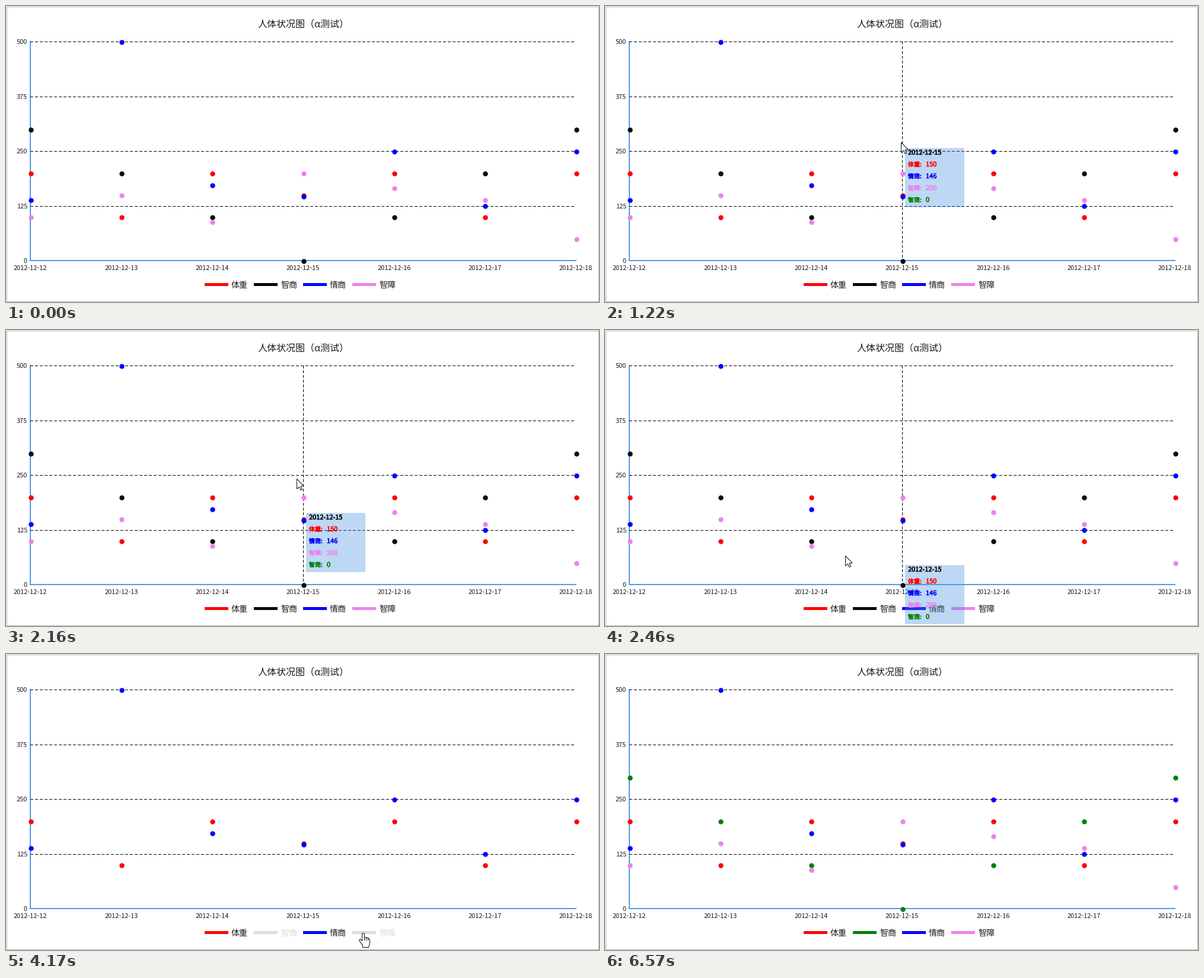
Write a matplotlib script that moves like this. It is 1000 px wide and 500 px high and loops after 6850 ms.

```python
import numpy as np
import matplotlib.pyplot as plt
from matplotlib.animation import FuncAnimation
from matplotlib.patches import Polygon, Rectangle
from matplotlib.patheffects import withStroke

W, H, DPI = 1000, 500, 100
LOOP, STEP = 6850, 25
PX = 72 / DPI
LEFT, RIGHT, TOP, BOTTOM = 41, 961, 60, 430
LEAD = 80          # the tooltip runs ahead of the drawn pointer (ms)
AXIS, TIP, OFF, INK = "#559ae8", "#4a90e2", "#dddddd", "#1a1a1a"

plt.rcParams["font.family"] = "Noto Sans CJK JP"

DATES = [f"2012-12-{d}" for d in range(12, 19)]
DAY_X = np.linspace(LEFT, RIGHT, len(DATES))
SERIES = {
    "体重": ("red", [200, 100, 200, 150, 200, 100, 200]),
    "智商": ("#0a0a0a", [300, 200, 100, 0, 100, 200, 300]),
    "情商": ("blue", [138, 500, 172, 146, 250, 125, 250]),
    "智障": ("violet", [100, 150, 89, 200, 165, 138, 50]),
}
TIP_ORDER = ["体重", "情商", "智障", "智商"]

# pointer moves: depart, arrive, x, y; it rests in between
START = (149, 484)
MOVES = [
    (50, 240, 294, 330), (590, 700, 375, 256), (890, 1200, 499, 230),
    (1280, 1730, 606, 167), (1730, 1900, 622, 140), (1960, 2160, 494, 245),
    (2160, 2400, 395, 380), (2430, 2610, 440, 386), (2640, 2760, 425, 442),
    (2760, 3090, 437, 474), (3300, 3810, 602, 471), (4360, 4520, 613, 470),
    (5040, 5530, 440, 473), (6040, 6550, 470, 510),
]
ENTER, LEAVE = MOVES[0][0], MOVES[-1][1]

ARROW = np.array([(0, 0), (0, 17), (4, 13.5), (6.5, 19), (9, 18),
                  (6.5, 12.5), (11.5, 12)])
KNUCKLES = [p for k in range(3)
            for p in [(2 + 3 * k, 7 + k / 2), (2 + 3 * k, 12), (2 + 3 * k, 7 + k / 2)]]
HAND = np.array([(-2, 13), (-2, 1), (0, 0), (2, 1), *KNUCKLES, (11, 11),
                 (11, 17), (9, 24), (-1, 24), (-1, 21), (-7, 12), (-5, 10)])

fig = plt.figure(figsize=(W / DPI, H / DPI), dpi=DPI, facecolor="white")
ax = fig.add_axes([0, 0, 1, 1])
ax.set_xlim(0, W)
ax.set_ylim(H, 0)
ax.axis("off")


def y_of(value):
    return BOTTOM - np.asarray(value) * (BOTTOM - TOP) / 500


def label(x, y, s, size, color=INK, ha="left", **kw):
    """Text whose glyphs are vertically centred on y."""
    return ax.text(x, y + 0.37 * size, s, fontsize=size * PX, color=color,
                   ha=ha, va="baseline", **kw)


def box(x, y, w, h, color, **kw):
    return ax.add_patch(Rectangle((x, y), w, h, fc=color, lw=0, **kw))


def dashed(xs, ys):
    return ax.plot(xs, ys, color="black", lw=PX, ls=(0, (5, 3)), zorder=2,
                   snap=False)[0]


# frame, title, axes and grid
ax.add_patch(Rectangle((0.5, 0.5), 998, 498, fill=False, ec="#b4b4b4", lw=PX))
label(424, 30.5, "人体状况图（α测试）", 16)
box(LEFT - 1, TOP - 1, 2, BOTTOM - TOP + 1, AXIS)
box(LEFT - 1, BOTTOM - 1, RIGHT - LEFT + 2, 2, AXIS)
for v in range(0, 501, 125):
    label(36, y_of(v), str(v), 11, ha="right")
    if v:
        dashed([LEFT, RIGHT], [np.ceil(y_of(v)) + 0.5] * 2)
for x, day in zip(DAY_X, DATES):
    label(x, 442, day, 11, ha="center")

# series dots and legend
dots, bars, names = {}, {}, {}
for i, (name, (color, values)) in enumerate(SERIES.items()):
    x = 335 + 83 * i
    dots[name] = ax.scatter(DAY_X + 0.5, y_of(values) + 0.5, s=(8.4 * PX) ** 2,
                            c=color, linewidths=0, zorder=3 + 0.1 * i)
    bars[name] = box(x, 468, 40, 5, color)
    names[name] = label(x + 45, 471, name, 14)

# hover guide and tooltip
guide = dashed([0, 0], [TOP, BOTTOM])
tip_box = box(0, 0, 100, 100, TIP, alpha=0.36, zorder=5)


def bold(s, size, color):
    return label(0, 0, s, size, color, zorder=6,
                 path_effects=[withStroke(linewidth=0.45, foreground=color)])


# each part: text artist and its offset in the tooltip
tip_date = bold("", 11, "black")
tip_parts = [(tip_date, 5, 11)]
tip_values = {}
for i, name in enumerate(TIP_ORDER):
    color = "green" if name == "智商" else SERIES[name][0]
    tip_values[name] = bold("", 11, color)
    row_y = 31 + 20 * i
    tip_parts += [(bold(name + ":", 10, color), 5, row_y),
                  (tip_values[name], 35, row_y)]
hover = [guide, tip_box] + [part[0] for part in tip_parts]

pointer = ax.add_patch(Polygon(ARROW, closed=True, fc="white", ec="#0c0c1c",
                               lw=PX, zorder=9))


def pos(t):
    p = np.array(START, float)
    for depart, arrive, x, y in MOVES:
        p += (np.array([x, y]) - p) * np.clip((t - depart) / (arrive - depart), 0, 1)
    return p


def paint_series(name, on, color):
    dots[name].set_visible(on)
    dots[name].set_facecolor(color)
    bars[name].set_facecolor(color if on else OFF)
    names[name].set_color(INK if on else OFF)


def paint_hover(t):
    x, y = pos(t + LEAD)
    shown = t >= ENTER and y < BOTTOM
    for artist in hover:
        artist.set_visible(shown)
    if not shown:
        return
    day = int(np.abs(DAY_X - x).argmin())
    gx = DAY_X[day]
    left = round(gx + 5 if day <= 3 else gx - 105)
    top = round(y + 13)
    guide.set_xdata([np.floor(gx) + 0.5] * 2)
    tip_box.set_xy((left, top))
    tip_date.set_text(DATES[day])
    for name, text in tip_values.items():
        text.set_text(str(SERIES[name][1][day]))
    for text, dx, dy in tip_parts:
        text.set_position((left + dx, top + dy))


def paint_pointer(t):
    x, y = np.round(pos(t))
    pointer.set_visible(ENTER <= t < LEAVE)
    on_legend = 460 < y < 482 and 335 < x < 660
    pointer.set_xy((HAND if on_legend else ARROW) + (x + 0.5, y + 0.5))


def update(n):
    t = n * STEP + 20
    paint_series("智商", not 3280 <= t < 6020,
                 SERIES["智商"][0] if t < 6020 else "green")
    paint_series("智障", not 4170 <= t < 5000, "violet")
    paint_hover(t)
    paint_pointer(t)
    return []


anim = FuncAnimation(fig, update, frames=LOOP // STEP, interval=STEP,
                     init_func=lambda: update(0), repeat=True, repeat_delay=0)
plt.show()
```
